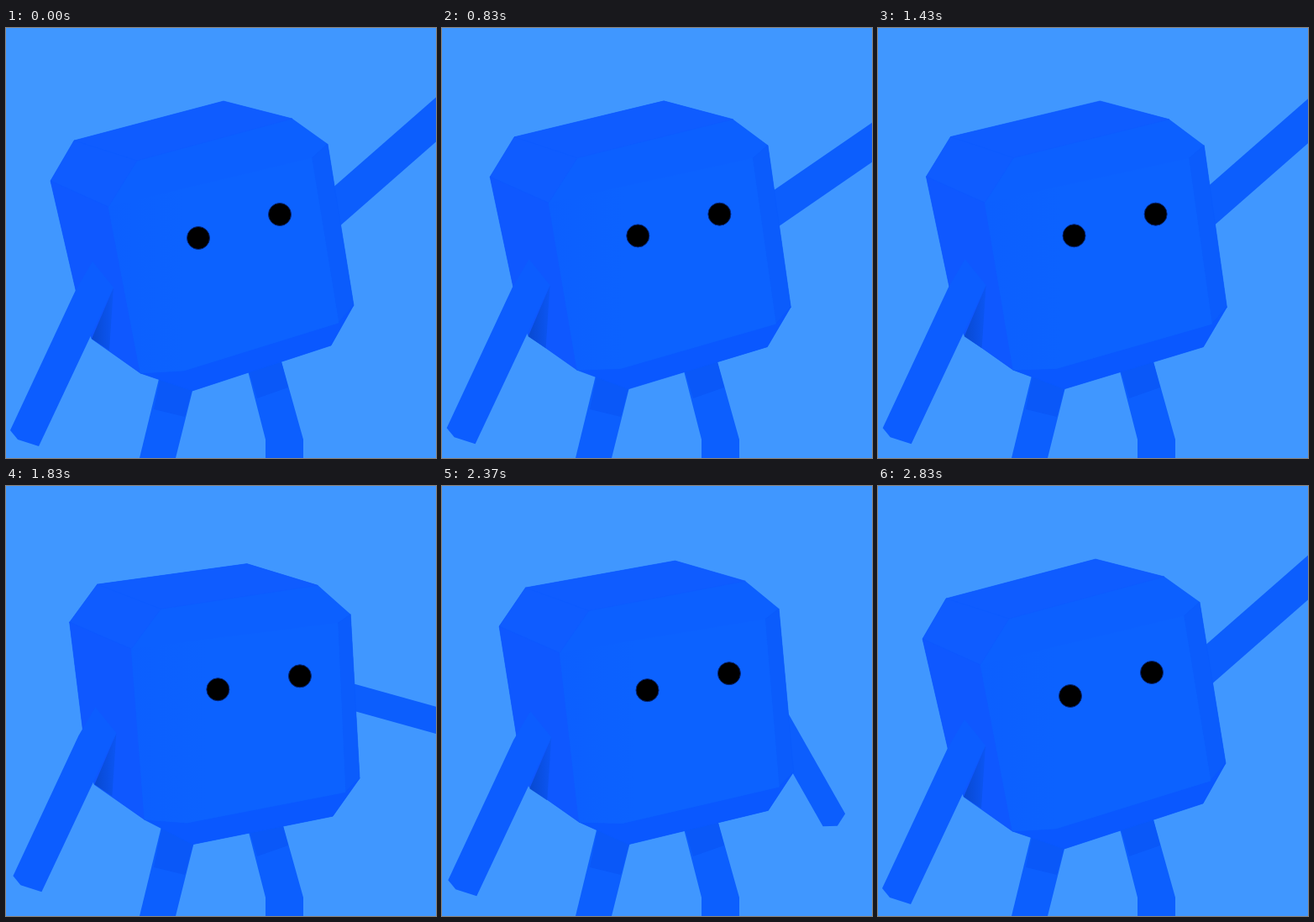
Animation, 512 px wide and 512 px high, one loop 2860 ms. Source, as an HTML page with a canvas:

```html
<!DOCTYPE html>
<html lang="en">
<head>
<meta charset="utf-8">
<title>Waving cube</title>
<style>
html, body { margin: 0; width: 100%; height: 100%; overflow: hidden; background: #4097ff; }
canvas { display: block; width: 100vw; height: 100vh; }
</style>
</head>
<body>
<canvas id="stage" width="512" height="512"></canvas>
<script>
const ctx = document.getElementById('stage').getContext('2d');
const LOOP = 2860, STEP = 100 / 3;

// Corners of the bevelled cube at rest: x, y and depth (1 = front face)
const CUBE = {
  top: [259, 87, -0.6], topR: [341, 108, 0], right: [383, 138, 0],
  lowR: [414, 330, 0], baseR: [387, 378, 0], baseL: [222, 432, 0.5],
  under: [160, 411, 0.8], lowL: [102, 370, 0], armpit: [83, 312, 0],
  left: [53, 182, 0], topL: [81, 134, 0], roof: [156, 158, 0.4],
  faceTL: [122, 213, 1], faceTR: [364, 155, 0.7],
  faceBL: [212, 408, 0.6], faceBR: [396, 351, 0.4],
  eyeL: [229, 250, 1], eyeR: [326, 222, 0.7]
};

function ease(t, from, to) {
  const x = Math.min(1, Math.max(0, (t - from) / (to - from)));
  return x * x * (3 - 2 * x);
}

function leanAt(t) {
  return 0.18 * ease(t, 0, 420) + 0.92 * ease(t, 1400, 1960) - 1.1 * ease(t, 2060, 2760);
}

// Two waves, then the arm drops and swings back up; degrees
function waveAt(t) {
  const wave = 30.7 + 10.5 * Math.cos(2 * Math.PI * Math.min(t, 1400) / 700);
  return wave - 108 * (ease(t, 1430, 2210) - ease(t, 2302, 2740));
}

// Roll around the feet; nearer points also turn right and up
function lean([x, y, z], u) {
  const dx = 0.107 * (370 - y) + 3 + 8 * z;
  const dy = 0.107 * (x - 250) + 1 - 6.5 * z;
  return [x + dx * u, y + dy * u - 8 * u * (1 - u)];
}

function poly(points, fill, seam) {
  ctx.beginPath();
  points.forEach(([x, y]) => ctx.lineTo(x, y));
  ctx.closePath();
  ctx.fillStyle = fill;
  ctx.fill();
  if (seam) {
    ctx.strokeStyle = fill;
    ctx.lineWidth = 0.6;
    ctx.stroke();
  }
}

function fade([x, y], width, c0, c1) {
  const g = ctx.createLinearGradient(x, y, x + width, y);
  g.addColorStop(0, c0);
  g.addColorStop(1, c1);
  return g;
}

function legs() {
  const skin = '#0c5ffe', shadow = '#0a58f8';
  poly([[190, 385], [232, 392], [222, 432], [202, 512], [159, 512]], skin);
  poly([[190, 385], [232, 392], [213, 463], [176, 454]], shadow);
  poly([[282, 385], [324, 383], [354, 490], [354, 512], [309, 512], [309, 490]], skin);
  poly([[282, 385], [324, 383], [336, 428], [299, 441]], shadow);
}

// Perspective makes the raised arm longer and thicker
function wavingArm(u, deg) {
  const w = 30.5 + 9.5 * Math.max(0, deg + 20) / 62;
  const len = 6.2 * w, h = w / 2;
  ctx.save();
  ctx.translate(375, 229 + 12 * u - 4 * u * (1 - u));
  ctx.rotate(-deg * Math.PI / 180);
  poly([[0, -h], [len - 3, -h], [len + 5, 0], [len - 3, h], [0, h]], '#0c5efd');
  ctx.restore();
}

function body(p) {
  const face = (names, fill, seam = true) => poly(names.split(' ').map(n => p[n]), fill, seam);
  face('top topR right lowR baseR baseL under lowL armpit left topL', '#0c60ff', false);
  face('topL top topR roof', '#0f5cff');
  face('topL roof faceTL left', '#0f5cff');
  face('left faceTL under lowL armpit', '#0f58ff');
  face('faceTR right lowR faceBR', '#0b5cfc');
  face('under faceBL faceBR lowR baseR baseL', '#0a58ff');
  face('faceTL faceTR faceBR faceBL under', fade(p.faceTL, 90, '#0c5fff', '#0c62ff'));
}

function restingArm(u, corner) {
  ctx.save();
  ctx.translate(3.5 * u, -15 * u);
  poly([[128, 309], corner, [123, 384]], fade(corner, 26, '#0849d0', '#0c56f4'));
  poly([[103, 278], [128, 309], [39, 498], [14, 490], [5, 479], [83, 312]], '#0c5dff');
  ctx.restore();
}

function eye([x, y]) {
  ctx.beginPath();
  ctx.arc(x, y, 13.5, 0, Math.PI * 2);
  ctx.fillStyle = '#000';
  ctx.fill();
  ctx.strokeStyle = '#04257a';
  ctx.lineWidth = 1;
  ctx.stroke();
}

function draw(now) {
  const t = Math.floor((now % LOOP + 4) / STEP) * STEP;
  const u = leanAt(t);
  const p = {};
  for (const name in CUBE) p[name] = lean(CUBE[name], u);
  ctx.fillStyle = '#4097ff';
  ctx.fillRect(0, 0, 512, 512);
  legs();
  wavingArm(u, waveAt(t));
  body(p);
  restingArm(u, CUBE.lowL);
  eye(p.eyeL);
  eye(p.eyeR);
}

let start;
function tick(now) {
  if (start === undefined) start = now;
  draw(now - start);
  requestAnimationFrame(tick);
}
draw(0);
requestAnimationFrame(tick);
</script>
</body>
</html>
```
